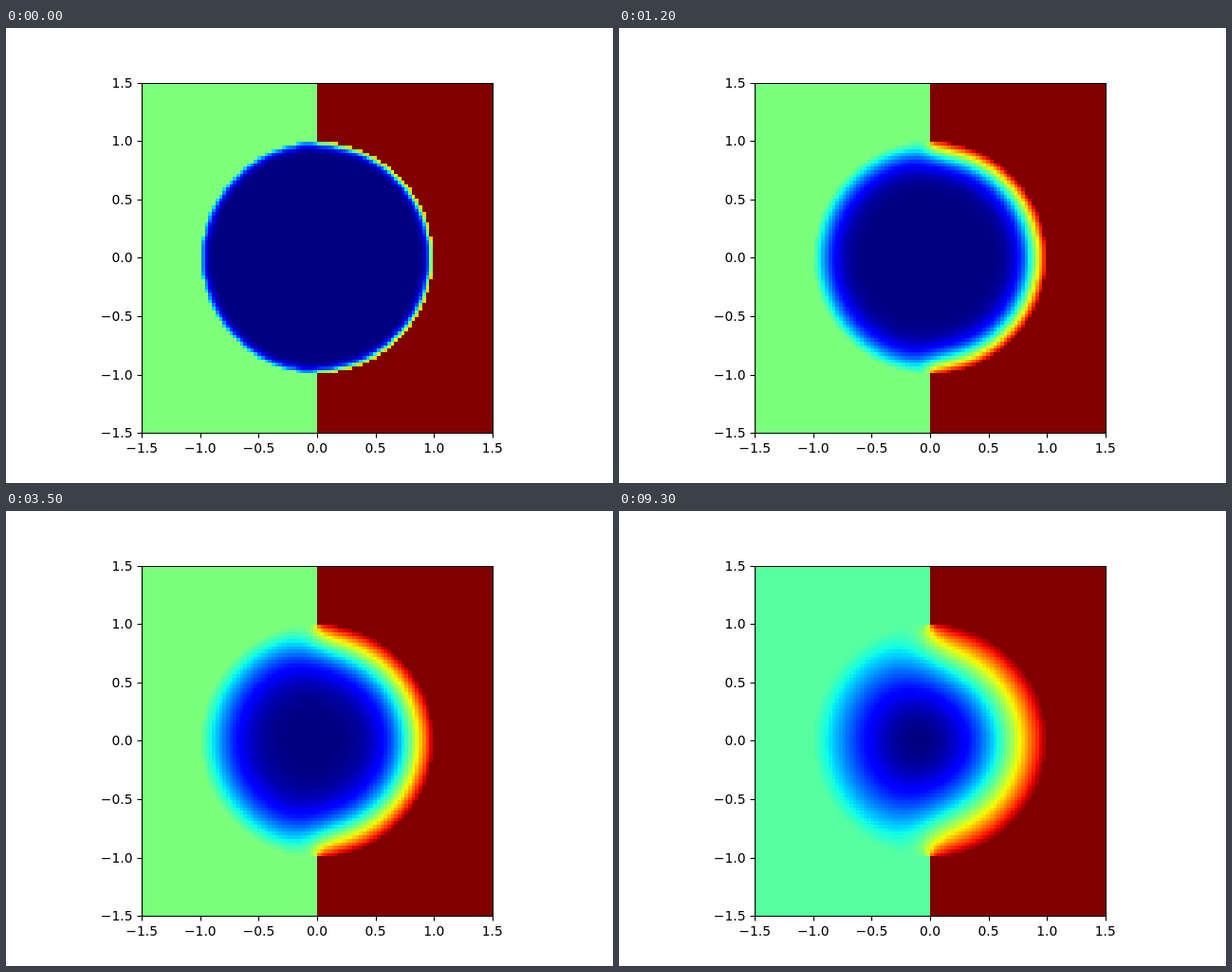
Write an HTML page with a canvas that moves like this. It is 640 by 480 pixels and loops after 10000 ms.

```html
<!DOCTYPE html>
<html lang="en">
<head>
<meta charset="utf-8">
<title>Heat flow in a disc</title>
<style>
  html, body { margin: 0; width: 100%; height: 100%; overflow: hidden; background: #fff; }
  canvas, svg { position: absolute; left: 0; top: 0; display: block; }
  text { font: 13.89px "DejaVu Sans", sans-serif; fill: #000; }
  path { fill: none; stroke: #000; stroke-width: 1.11; }
</style>
</head>
<body>
<canvas id="plot" width="640" height="480"></canvas>
<svg id="axes" width="640" height="480" viewBox="0 0 640 480"></svg>
<script>
const N = 100, FRAMES = 100, FRAME_MS = 100, STEPS = 8;
const LEFT = 143.2, TOP = 57.6, SIDE = 369.6;
const TIME_PER_FRAME = 0.00098;
const spacing = 3 / (N - 1);
const rate = TIME_PER_FRAME / STEPS / spacing ** 2;

// Piecewise linear curve through [x, y] stops.
function ramp(x, stops) {
  for (let i = 1; i < stops.length; i++) {
    const [x0, y0] = stops[i - 1], [x1, y1] = stops[i];
    if (x <= x1) return y0 + (y1 - y0) * (x - x0) / (x1 - x0);
  }
  return stops[stops.length - 1][1];
}

const red = [[0, 0], [.35, 0], [.66, 1], [.89, 1], [1, .5]];
const green = [[0, 0], [.125, 0], [.375, 1], [.64, 1], [.91, 0], [1, 0]];
const blue = [[0, .5], [.11, 1], [.34, 1], [.65, 0], [1, 0]];
const palette = Array.from({ length: 256 }, (_, i) => {
  const [r, g, b] = [red, green, blue].map(c => Math.round(255 * ramp(i / 255, c)));
  return (255 << 24 | b << 16 | g << 8 | r) >>> 0;
});

// Heat equation: a cold disc between a warm left side and a hot right side.
function simulate() {
  let now = new Float32Array(N * N);
  const inside = [];
  for (let row = 0; row < N; row++) {
    for (let col = 0; col < N; col++) {
      const x = -1.5 + col * spacing, y = -1.5 + row * spacing;
      const cell = row * N + col;
      if (x * x + y * y < 1) inside.push(cell);
      else now[cell] = x > 0 ? 2 : 1;
    }
  }
  let next = now.slice();
  return Array.from({ length: FRAMES }, () => {
    for (let s = 0; s < STEPS; s++) {
      for (const c of inside) {
        next[c] = now[c] + rate * (now[c - 1] + now[c + 1] + now[c - N] + now[c + N] - 4 * now[c]);
      }
      [now, next] = [next, now];
    }
    return now.slice();
  });
}

// Runs of frames at which the picture is refreshed; it holds in between.
const refreshed = [[0, 16], [18], [20], [22], [24], [26], [28], [30, 31], [33], [35], [38, 39],
  [41], [43], [46], [48, 51], [53, 54], [57, 60], [63], [66, 73], [78, 79], [82, 87], [93]];
function shownFrame(frame) {
  let shown = 0;
  for (const [first, last = first] of refreshed) {
    if (first <= frame) shown = Math.min(frame, last);
  }
  return shown;
}

const X0 = 143, Y0 = 58, SIZE = 370;
const ctx = document.getElementById("plot").getContext("2d");
const image = ctx.createImageData(SIZE, SIZE);
const pixels = new Uint32Array(image.data.buffer);
const cellAt = (pixel, origin) =>
  Math.max(0, Math.min(N - 1, Math.floor((pixel + .5 - origin) * N / SIDE)));
const columns = Array.from({ length: SIZE }, (_, i) => cellAt(X0 + i, LEFT));
const rows = Array.from({ length: SIZE }, (_, i) => cellAt(Y0 + i, TOP));

function paint(field) {
  const low = field.reduce((a, b) => Math.min(a, b));
  const colours = Array.from(field, v =>
    palette[Math.min(255, Math.floor(256 * (v - low) / (2 - low)))]);
  for (let y = 0; y < SIZE; y++) {
    for (let x = 0; x < SIZE; x++) pixels[y * SIZE + x] = colours[rows[y] * N + columns[x]];
  }
  ctx.putImageData(image, X0, Y0);
}

function drawAxes() {
  let lines = "M143.5 58.5H513.5V427.5H143.5Z", labels = "";
  for (let i = 0; i < 7; i++) {
    const value = i / 2 - 1.5;
    const x = LEFT + i * SIDE / 6, y = TOP + SIDE - i * SIDE / 6;
    const label = (value < 0 ? "\u2212" : "") + Math.abs(value).toFixed(1);
    lines += `M${Math.round(x) + .5} 427.5v5M143.5 ${Math.round(y) + .5}h-5`;
    labels += `<text x="${x}" y="448" text-anchor="middle">${label}</text>`
      + `<text x="133.5" y="${Math.round(y + 5)}" text-anchor="end">${label}</text>`;
  }
  document.getElementById("axes").innerHTML = `<path d="${lines}"/>${labels}`;
}

const fields = simulate();
let current = -1;
function tick() {
  const elapsed = performance.now() - start;
  const frame = shownFrame(Math.floor(elapsed / FRAME_MS) % FRAMES);
  if (frame !== current) paint(fields[current = frame]);
  requestAnimationFrame(tick);
}

drawAxes();
const start = performance.now();
tick();
</script>
</body>
</html>
```
